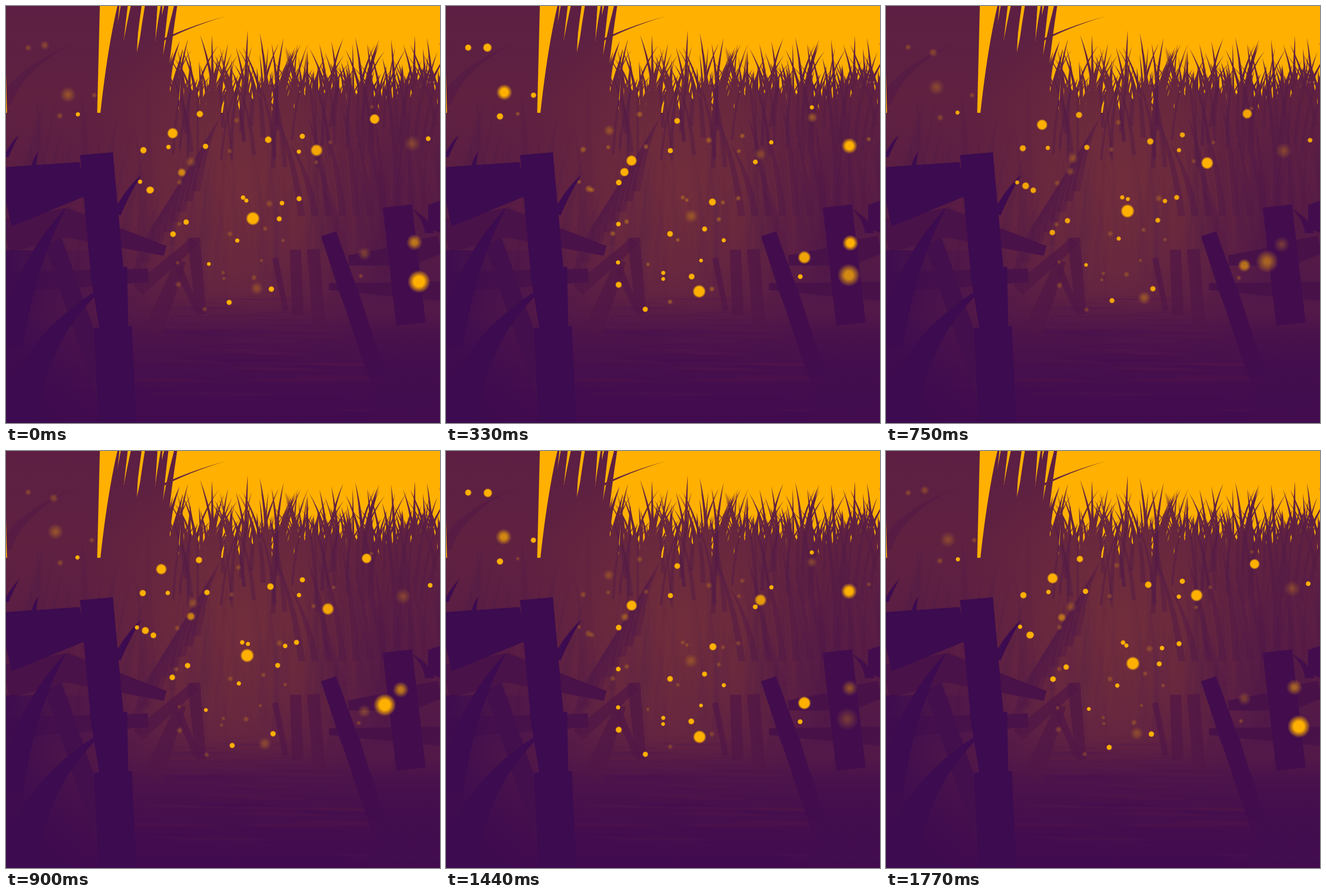
An HTML page with a canvas that plays this animation: 763x734 px, repeating every 1.8 s.

```html
<!DOCTYPE html>
<html lang="en">
<head>
<meta charset="utf-8">
<title>Fireflies</title>
<style>
html, body { margin: 0; width: 100%; height: 100%; overflow: hidden; background: #430c4e; }
canvas { display: block; }
</style>
</head>
<body>
<canvas id="stage" width="763" height="734"></canvas>
<script>
const W = 763, H = 734, LOOP = 1800, BLINK = 900, STEP = 30, TAU = Math.PI * 2;
const GOLD = '#ffb000';
const ctx = document.getElementById('stage').getContext('2d');

let seed = 41;
function rnd(a = 0, b = 1) {
  seed = (seed + 0x6d2b79f5) | 0;
  let n = Math.imul(seed ^ (seed >>> 15), 1 | seed);
  n = (n + Math.imul(n ^ (n >>> 7), 61 | n)) ^ n;
  return a + (b - a) * (((n ^ (n >>> 14)) >>> 0) / 4294967296);
}

function repeat(n, fn) {
  for (let i = 0; i < n; i++) fn(i);
}

function layer() {
  const c = document.createElement('canvas');
  c.width = W; c.height = H;
  return c.getContext('2d');
}

function fade(g, x0, y0, x1, y1, ...stops) {
  const f = g.createLinearGradient(x0, y0, x1, y1);
  stops.forEach(([at, color]) => f.addColorStop(at, color));
  return f;
}

// Tapered leaf that rises from its base and bends over towards the tip.
function blade(g, x0, y0, x1, y1, w, lean = 0.2) {
  const cx = x0 + (x1 - x0) * lean, cy = y0 + (y1 - y0) * 0.62;
  g.beginPath();
  g.moveTo(x0 - w / 2, y0);
  g.quadraticCurveTo(cx - w * 0.4, cy, x1, y1);
  g.quadraticCurveTo(cx + w * 0.4, cy, x0 + w / 2, y0);
  g.fill();
}

// Plank between two points, with a width at each end.
function beam(g, x0, y0, x1, y1, w0, w1 = w0) {
  const len = Math.hypot(x1 - x0, y1 - y0);
  const nx = (y1 - y0) / len / 2, ny = (x0 - x1) / len / 2;
  g.beginPath();
  g.moveTo(x0 + nx * w0, y0 + ny * w0);
  g.lineTo(x1 + nx * w1, y1 + ny * w1);
  g.lineTo(x1 - nx * w1, y1 - ny * w1);
  g.lineTo(x0 - nx * w0, y0 - ny * w0);
  g.fill();
}

function reeds(g) {
  g.fillStyle = fade(g, 0, 0, 0, H, [0, '#5c1f43'], [0.22, '#602141'], [0.5, '#591c45'],
    [0.68, '#52184a'], [0.8, '#4a114c'], [1, '#410b50']);
  g.fillRect(0, 188, W, H);
  beam(g, 81, 0, 81, 200, 168, 158);

  // wall of reeds: dense low tufts, thin higher ones, a few tall tips
  repeat(180, () => {
    const x = rnd(280, 780);
    blade(g, x, 240, x + rnd(-38, 38), rnd(95, 160), rnd(8, 13));
  });
  repeat(150, () => {
    const x = rnd(275, 790);
    blade(g, x, 235, x + rnd(-55, 55), rnd(64, 128), rnd(5, 9), rnd(0, 0.3));
  });
  repeat(22, i => {
    const x = 320 + i * 21;
    blade(g, x + rnd(-36, 36), 230, x, rnd(36, 78), 8, rnd(0.1, 0.3));
  });

  // big clump on the left, leaning right
  repeat(15, i => {
    const x = 168 + i * 6.5;
    blade(g, x, 290, x + rnd(20, 52), rnd(-60, -5), rnd(18, 30), 0.35);
  });
  repeat(12, i => {
    const x = 215 + i * 6;
    blade(g, x, 290, x + rnd(20, 50), rnd(45, 115), rnd(12, 18), 0.3);
  });
  blade(g, 190, 122, 386, 18, 14, 0.3);

  // warm light in the middle, on the plants only
  g.globalCompositeOperation = 'source-atop';
  g.save();
  g.translate(410, 325);
  g.scale(0.82, 1);
  const glow = g.createRadialGradient(0, 0, 0, 0, 0, 350);
  glow.addColorStop(0, 'rgba(116,47,58,.92)');
  glow.addColorStop(0.4, 'rgba(113,46,58,.72)');
  glow.addColorStop(1, 'rgba(110,42,60,0)');
  g.fillStyle = glow;
  g.fillRect(-600, -400, 1200, 900);
  g.restore();

  // darker stalks, fanning out and stronger away from the middle
  repeat(130, () => {
    const x = rnd(-20, 790), side = (x - 410) / 300, strength = Math.min(1, Math.abs(side));
    g.fillStyle = `rgba(78,21,70,${0.05 + 0.17 * strength})`;
    blade(g, x, rnd(400, 540), x - side * 20 + rnd(-45, 45), rnd(130, 330), rnd(8, 24));
  });
  repeat(9, i => {
    g.fillStyle = 'rgba(80,22,70,.45)';
    blade(g, 230 + i * 13, 470 - i * 18, 290 + i * 11, 345 - i * 19, 16, 0.3);
    blade(g, 520 + i * 24, 370, 468 + i * 30, rnd(160, 270), 13, 0.3);
  });
  repeat(60, () => {
    const x = rnd(290, 780);
    g.fillStyle = 'rgba(84,25,68,.5)';
    blade(g, x, rnd(210, 290), x + rnd(-45, 45), rnd(70, 135), rnd(4, 9));
  });
  g.fillStyle = 'rgba(80,22,70,.5)';
  blade(g, -4, 175, 126, 64, 26, 0.2);
}

function ground(g) {
  g.fillStyle = fade(g, 0, 508, 0, H, [0, 'rgba(90,30,68,0)'], [0.12, 'rgba(86,27,70,.6)'],
    [0.3, '#4d144b'], [0.65, '#450e4d'], [1, '#410b50']);
  g.fillRect(0, 508, W, H - 508);
  repeat(60, () => {
    const y = 515 + 215 * rnd() ** 1.6, s = (y - 500) / 230;
    g.fillStyle = rnd() < 0.5 ? 'rgba(112,40,66,.09)' : 'rgba(60,10,80,.12)';
    g.beginPath();
    g.ellipse(410 + rnd(-1, 1) * (70 + 230 * s), y, rnd(25, 60) + 70 * s, 1 + 3 * s, 0.02, 0, TAU);
    g.fill();
  });
}

function fences(g) {
  // far posts on both sides of the path
  g.fillStyle = 'rgba(80,22,71,.7)';
  beam(g, 330, 408, 343, 543, 22, 18);
  beam(g, 332, 414, 232, 500, 17, 24);
  beam(g, 303, 460, 335, 536, 14, 10);
  beam(g, 308, 448, 258, 575, 18, 34);
  beam(g, 473, 443, 492, 537, 10);
  beam(g, 509, 429, 513, 545, 20);
  beam(g, 540, 428, 551, 568, 22);

  // left rails
  g.fillStyle = '#491249';
  beam(g, 0, 405, 110, 380, 60, 50);
  beam(g, 100, 380, 280, 431, 52, 18);
  beam(g, 0, 487, 250, 474, 36, 24);
  g.fillStyle = fade(g, 0, 0, 160, 0, [0, 'rgba(60,11,80,.85)'], [1, 'rgba(60,11,80,0)']);
  g.fillRect(0, 430, 160, H - 430);
  g.fillStyle = '#430f4c';
  beam(g, 83, 414, 183, 706, 32, 36);

  // left post, top rail and leaves
  g.fillStyle = '#3c0b50';
  beam(g, -2, 336, 136, 304, 106, 60);
  beam(g, 159, 260, 178, 470, 58);
  beam(g, 180, 462, 190, 570, 66, 50);
  beam(g, 188, 565, 196, H, 66);
  blade(g, 0, 266, 23, 226, 9, 0.5);
  blade(g, 48, 290, 57, 256, 9);
  blade(g, 194, 368, 239, 296, 16, 0.45);
  blade(g, 5, 600, 106, 355, 48, 0.3);
  blade(g, 20, H + 10, 182, 487, 68, 0.12);

  // right rails
  g.fillStyle = '#481249';
  beam(g, 602, 448, 675, 441, 18, 32);
  beam(g, 568, 494, W, 502, 12, 34);
  beam(g, 714, 434, W, 420, 42, 32);

  // right posts
  g.fillStyle = '#430d4d';
  beam(g, 742, 371, W, 371, 42, 56);
  blade(g, 745, 400, 713, 357, 16);
  beam(g, 567, 401, 605, 510, 28, 32);
  beam(g, 604, 505, 652, 650, 32, 30);
  beam(g, 688, 352, 712, 560, 52);
  g.fillStyle = fade(g, 0, 540, 0, 640, [0, 'rgba(66,13,78,0)'], [1, 'rgba(66,13,78,.8)']);
  g.fillRect(640, 540, W - 640, H - 540);
}

function scenery() {
  const g = layer(), plants = layer();
  g.fillStyle = GOLD;
  g.fillRect(0, 0, W, H);
  reeds(plants);
  g.drawImage(plants.canvas, 0, 0);
  ground(g);
  fences(g);
  return g.canvas;
}

// Large fireflies: centre, radius, time of peak light, sway.
const flies = [
  [98, 149, 12, 320, 11, 7], [76, 76, 7, 400, -8, -7], [283, 216, 8.5, 0, 10, 8],
  [317, 292, 7, 230, -8, 1], [327, 271, 8.5, 400, -2, 3], [448, 506, 10, 430, -7, -9],
  [429, 367, 10.5, 0, 5, 7], [556, 266, 9.5, 730, -10, -12], [641, 194, 8, 20, 7, 5],
  [706, 249, 12, 400, 8, -7], [706, 418, 12, 240, 12, -2], [696, 466, 17, 120, 30, 19],
  [630, 447, 10, 500, 0, -11], [472, 343, 6, 400, -9, 5], [429, 475, 5, 400, 7, 3],
  [249, 320, 6, 20, 4, 4]
];

// Small ones only have a place; size and sway follow from the seed.
function swarm(peak, ...places) {
  places.forEach(([x, y]) => flies.push([x, y, rnd(3.2, 5.6), peak, rnd(-3, 3), rnd(-2, 2)]));
}
swarm(400, [39, 73], [153, 157], [95, 195], [303, 311], [302, 384], [303, 451], [304, 491], [351, 534],
  [382, 470], [381, 481], [448, 448], [454, 393], [394, 401], [489, 412], [395, 254], [407, 203],
  [573, 240], [643, 179], [543, 274], [622, 477]);
swarm(20, [126, 189], [241, 252], [285, 249], [352, 248], [340, 191], [233, 310], [257, 324], [318, 379],
  [293, 400], [354, 455], [395, 520], [468, 498], [416, 337], [424, 341], [488, 345], [513, 338],
  [479, 376], [408, 411], [463, 237], [521, 228], [515, 255], [744, 235]);

function spark(x, y, r, light) {
  const size = r * 1.18, f = ctx.createRadialGradient(x, y, 0, x, y, size);
  f.addColorStop(0, GOLD);
  f.addColorStop((r > 11 ? 0.45 : 0.7) * light, GOLD);
  f.addColorStop(1, 'rgba(255,176,0,0)');
  ctx.globalAlpha = light;
  ctx.fillStyle = f;
  ctx.beginPath();
  ctx.arc(x, y, size, 0, TAU);
  ctx.fill();
}

const scene = scenery();

function draw(t) {
  ctx.globalAlpha = 1;
  ctx.drawImage(scene, 0, 0);
  const sway = Math.cos(TAU * t / LOOP);
  flies.forEach(([x, y, r, peak, dx, dy]) => {
    const pulse = 0.7 + 0.6 * Math.cos(TAU * (t - peak) / BLINK);
    spark(x + dx * sway, y + dy * sway, r, Math.min(1, Math.max(0.26, pulse)));
  });
}

const start = performance.now();
function tick() {
  const t = (performance.now() - start) % LOOP;
  draw(Math.floor(t / STEP) * STEP);
  requestAnimationFrame(tick);
}
tick();
</script>
</body>
</html>
```
